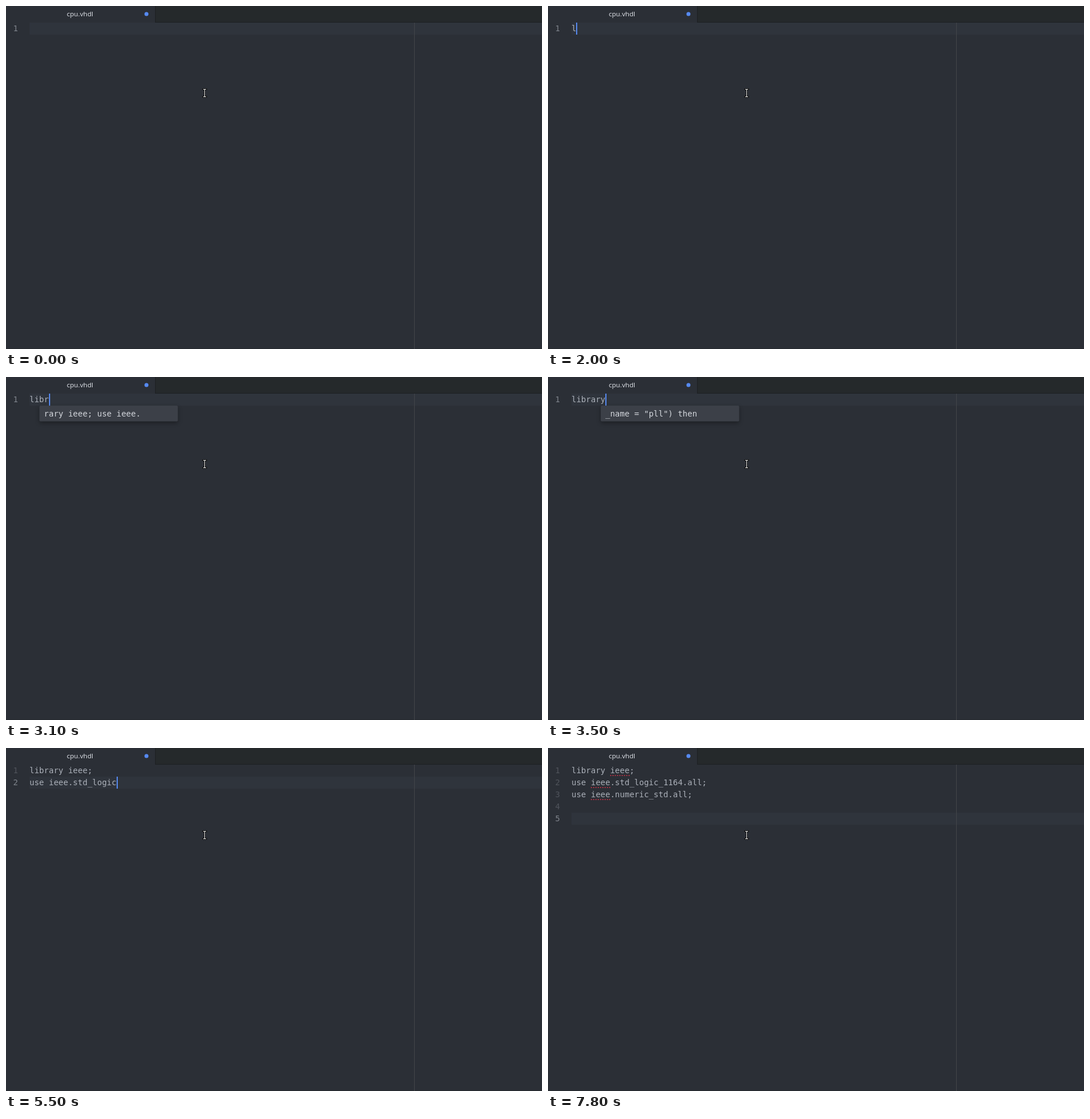
Write an HTML page with a canvas that moves like this. It is 935x599 px and loops after 8000 ms.

```html
<!DOCTYPE html>
<html lang="en">
<head>
<meta charset="utf-8">
<title>Code completion</title>
<style>
html, body { margin: 0; width: 100%; height: 100%; overflow: hidden; background: #2b2f36; }
canvas { display: block; }
</style>
</head>
<body>
<canvas id="stage" width="935" height="599"></canvas>
<script>
const ctx = document.getElementById('stage').getContext('2d');
const LOOP = 8000, LEFT = 41, TOP = 29, ROW = 21, CHAR = 8.43;
const MONO = '14px "DejaVu Sans Mono", monospace';

const PHRASE = 'library ieee; use ieee.std_logic';
const ODD_HINTS = { 2: 'Oi_dataout : STD_', 7: '_name = "pll") then' };
const KEYWORDS = ['library', 'linkage', 'literal'];

const line1 = 'library ieee;\n';
const line2 = 'use ieee.std_logic_1164.all;\n';
const line3 = 'use ieee.numeric_std.all;\n';

// [time, text, column of the hint or 'list']
const steps = [
  [0, ''], [2000, 'l'], [2200, 'li', 'list'], [2300, 'li', 2],
  [2700, 'lib', 2], [2800, 'lib', 3],
  [3100, 'libr', 3], [3200, 'libra', 5], [3300, 'librar', 6], [3500, 'library', 7],
  [3700, 'library ', 7], [3900, 'library ', 8],
  [4300, 'library i', 8], [4400, 'library i', 9], [4500, 'library ie', 10],
  [4700, 'library iee', 11], [4800, 'library ieee', 12],
  [5400, line1 + 'use ieee.std_logic', 12], [5500, line1 + 'use ieee.std_logic'],
  [6900, line1 + line2], [7000, line1 + line2 + 'use ieee.'],
  [7400, line1 + line2 + line3], [7500, line1 + line2 + line3 + '\n']
];
const caretToggles = [500, 900, 1300, 1700, 2000, 5800, 6200, 6600, 6900, 7800];
const spellChecks = [5800, 5800, 7800];

function rect(x, y, w, h, color) {
  ctx.fillStyle = color;
  ctx.fillRect(x, y, w, h);
}

function text(str, x, y, color, align = 'left', font = MONO) {
  ctx.font = font;
  ctx.textAlign = align;
  ctx.fillStyle = color;
  ctx.fillText(str, x, y);
}

function panel(x, y, w, h, color) {
  ctx.save();
  ctx.shadowColor = 'rgba(0,0,0,.35)';
  ctx.shadowBlur = 7;
  ctx.shadowOffsetY = 3;
  ctx.fillStyle = color;
  ctx.beginPath();
  ctx.roundRect(x, y, w, h, 2);
  ctx.fill();
  ctx.restore();
}

function drawTabs() {
  rect(260, 0, 675, 29, '#1c1f22');
  rect(261, 0, 674, 28, '#25292b');
  text('cpu.vhdl', 129, 18, '#d7dae0', 'center', '11.6px "Noto Sans", sans-serif');
  ctx.fillStyle = '#568af2';
  ctx.beginPath();
  ctx.arc(245, 14, 3.5, 0, 7);
  ctx.fill();
}

function drawSquiggle(x, y) {
  ctx.save();
  ctx.strokeStyle = '#cf3346';
  ctx.lineWidth = 2;
  ctx.lineCap = 'round';
  ctx.setLineDash([0, 4]);
  ctx.beginPath();
  ctx.moveTo(x + 1, y);
  ctx.lineTo(x + 4 * CHAR, y);
  ctx.stroke();
  ctx.restore();
}

function drawHint(col) {
  const x = LEFT + col * CHAR;
  panel(x - 8, 50, 241.5, 27.5, '#3c4048');
  text(ODD_HINTS[col] || PHRASE.slice(col, col + 20), x, 69, '#d3d6dc');
}

function drawList() {
  panel(3, 50, 356, 78, '#33373f');
  rect(3, 50, 356, 26, '#3c4048');
  KEYWORDS.forEach((word, i) => {
    rect(3, 50 + i * 26, 28, 26, '#3f4a55');
    text(word, LEFT, 68 + i * 26, '#d3d6dc');
  });
}

function drawPointer() {
  for (const [width, color] of [[3, '#111'], [1, '#eee']]) {
    ctx.strokeStyle = color;
    ctx.lineWidth = width;
    ctx.lineCap = width > 1 ? 'square' : 'butt';
    ctx.stroke(new Path2D('M344 145.5h5M344 158.5h5M346.5 145.5v13'));
  }
}

function draw(t) {
  const [, content, popup] = steps.findLast(step => step[0] <= t);
  const lines = content.split('\n');
  const current = lines.length - 1;

  rect(0, 0, 935, 599, '#2b2f36');
  rect(0, 598, 935, 1, '#26292f');
  drawTabs();
  rect(LEFT, TOP + current * ROW, 935 - LEFT, ROW, '#2f343c');
  rect(712, TOP, 1, 570, '#43464a');

  lines.forEach((line, i) => {
    const y = TOP + i * ROW;
    text(i + 1, 21, y + 15, i === current ? '#7f848c' : '#50545c', 'right');
    text(line, LEFT, y + 15, '#abb0b9');
    if (t >= spellChecks[i]) drawSquiggle(LEFT + line.indexOf('ieee') * CHAR, y + 19);
  });

  const caretOn = caretToggles.filter(time => time <= t).length % 2;
  if (caretOn) {
    rect(Math.round(LEFT + lines[current].length * CHAR), TOP + current * ROW, 2, ROW, '#568af2');
  }
  if (popup === 'list') drawList();
  else if (popup) drawHint(popup);
  drawPointer();
}

function tick() {
  draw(performance.now() % LOOP);
  requestAnimationFrame(tick);
}
tick();
</script>
</body>
</html>
```
